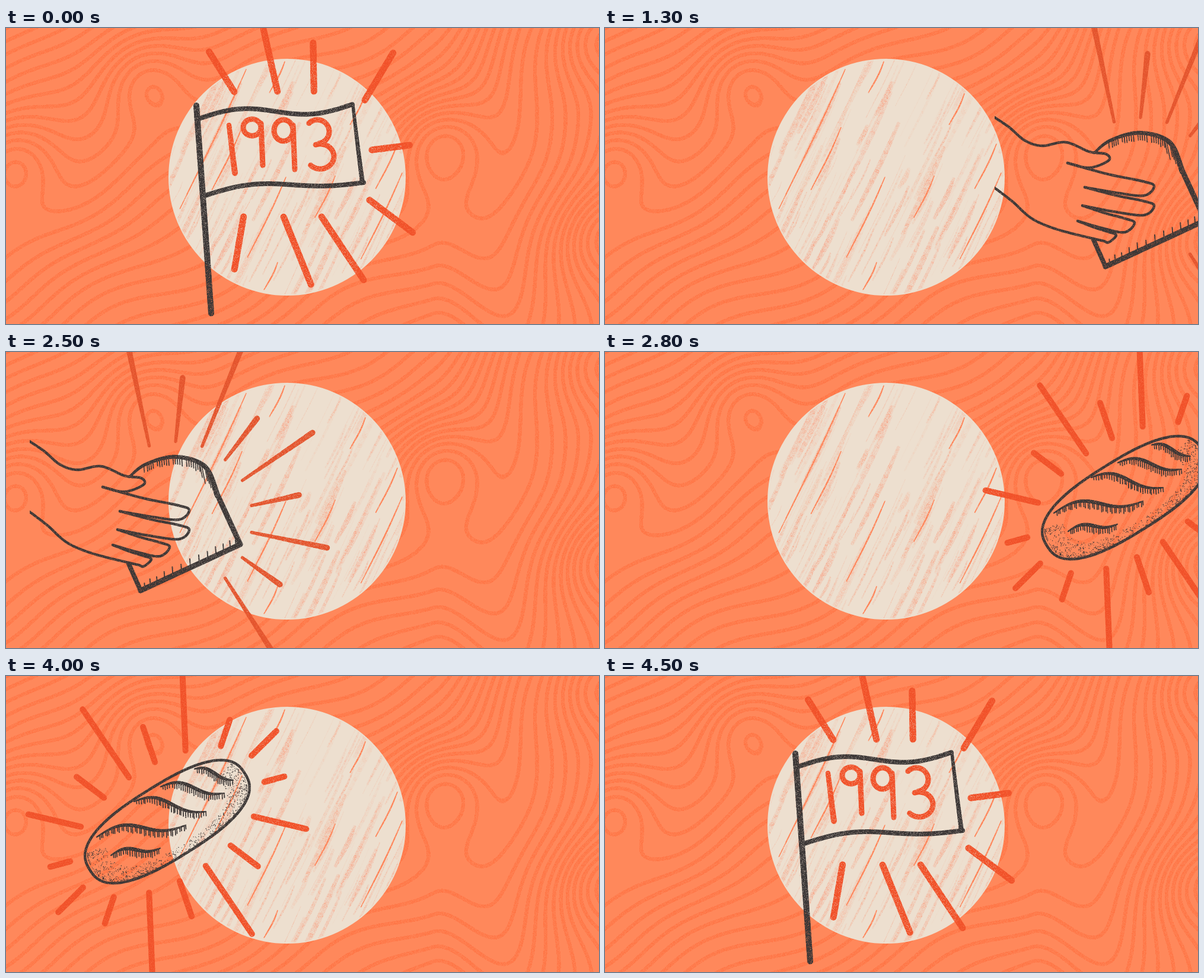
Recreate the animation shown at these times as an HTML page with a canvas. Size 1000x500 px, loop 4600 ms.

```html
<!DOCTYPE html>
<html lang="en">
<head>
<meta charset="utf-8">
<title>1993, sliced bread, loaf</title>
<style>
  html, body { margin: 0; width: 100%; height: 100%; overflow: hidden; background: #ff885b; }
  canvas { display: block; width: 100vw; height: 100vh; }
</style>
</head>
<body>
<canvas id="stage" width="1000" height="500" role="img" aria-label="A flag reading 1993, a hand with a slice of bread, a loaf"></canvas>
<script>
const W = 1000, H = 500;
const ORANGE = '#ff885b', CREAM = '#eddfcf', RED = '#f1522a', RUST = '#e4552e', INK = '#3d3837';
const { PI, sin, cos, abs, hypot, floor } = Math;
const rad = deg => deg * PI / 180;
const wave = (deg, phase = 0) => cos(rad(deg - phase));
const mix = (a, b, u) => a + (b - a) * u;

let seed = 1993;
function rnd() {
  seed = (seed + 0x6d2b79f5) | 0;
  let t = Math.imul(seed ^ (seed >>> 15), 1 | seed);
  t = (t + Math.imul(t ^ (t >>> 7), 61 | t)) ^ t;
  return ((t ^ (t >>> 14)) >>> 0) / 4294967296;
}

function layer() {
  const c = document.createElement('canvas');
  c.width = W;
  c.height = H;
  const g = c.getContext('2d');
  g.lineCap = g.lineJoin = 'round';
  return g;
}

// Wears random specks out of everything drawn so far on a layer.
function wear(g, share, strength) {
  const img = g.getImageData(0, 0, W, H), d = img.data;
  for (let i = 3; i < d.length; i += 4) {
    if (d[i] && rnd() < share) d[i] *= 1 - strength * mix(0.4, 1, rnd());
  }
  g.putImageData(img, 0, 0);
}

// Samples a function of progress 0..1.
const sample = (fn, n = 60) => Array.from({ length: n + 1 }, (_, i) => fn(i / n));

// Catmull-Rom curve through flat x,y pairs.
function spline(p) {
  const last = p.length / 2 - 1;
  const at = i => {
    const k = 2 * Math.max(0, Math.min(last, i));
    return [p[k], p[k + 1]];
  };
  return sample(u => {
    const i = Math.min(last - 1, floor(u * last)), t = u * last - i;
    const [a, b, c, d] = [at(i - 1), at(i), at(i + 1), at(i + 2)];
    return [0, 1].map(k => b[k] + 0.5 * t * (c[k] - a[k]
      + t * (2 * a[k] - 5 * b[k] + 4 * c[k] - d[k]
      + t * (3 * b[k] - a[k] - 3 * c[k] + d[k]))));
  }, last * 14);
}

// Line from one end to the other with an S bend (s) and a bow (b).
const ripple = (x1, y1, x2, y2, s, b) =>
  sample(u => [mix(x1, x2, u), mix(y1, y2, u) + s * sin(2 * PI * u) + b * sin(PI * u)]);

const arc = (cx, cy, rx, ry, from, to) =>
  sample(u => [cx + rx * wave(mix(from, to, u)), cy + ry * sin(rad(mix(from, to, u)))]);

function stroke(g, curve, width, color) {
  g.strokeStyle = color;
  g.lineWidth = width;
  g.beginPath();
  curve.forEach(q => g.lineTo(...q));
  g.stroke();
}

// Stroke whose width is a function of progress 0..1.
function brush(g, curve, width, color) {
  for (let i = 1; i < curve.length; i++) {
    stroke(g, [curve[i - 1], curve[i]], width(i / curve.length), color);
  }
}

function ticks(g, curve, gap, width, vec) {
  let run = 0;
  curve.forEach(([x, y], i) => {
    if (i) run += hypot(x - curve[i - 1][0], y - curve[i - 1][1]);
    if (run < gap) return;
    run -= gap;
    const [dx, dy] = vec(i / curve.length), k = mix(0.8, 1.15, rnd());
    stroke(g, [[x, y], [x + dx * k, y + dy * k]], width, INK);
  });
}

// Rays standing on a tilted superellipse; angles in degrees.
function burst(g, o) {
  for (let i = 0; i < o.count; i++) {
    const a = o.angle(i), dir = a + o.turn(i), len = o.lengths[i % o.lengths.length];
    const r = (abs(wave(a - o.tilt) / o.rx) ** o.power + abs(sin(rad(a - o.tilt)) / o.ry) ** o.power) ** (-1 / o.power);
    const x = o.x + r * wave(a), y = o.y + r * sin(rad(a));
    const line = sample(u => [x + u * len * wave(dir), y + u * len * sin(rad(dir))], 12);
    brush(g, line, u => mix(o.from, o.to, u), o.color);
  }
}

// Height field whose level lines form the wood grain.
function height(x, y) {
  const s = Math.max(0, Math.min(1, (x - 720) / 160)), ease = s * s * (3 - 2 * s);
  let f = mix(0.45 * x + 0.85 * y, 0.95 * x + 0.3 * y - 289, ease);
  f += 12 * sin(x / 60 + y / 90) + 8 * sin(y / 45 - x / 70);
  for (const [cx, cy] of [[10, 225], [235, 85], [735, 190], [1010, 350], [1000, 20]]) {
    f += 130 * Math.exp(-((x - cx) ** 2 + (y - cy) ** 2) / 6000);
  }
  return f;
}

function woodGrain() {
  const g = layer(), img = g.createImageData(W, H), gap = 25;
  for (let y = 0, i = 0; y < H; y++) {
    for (let x = 0; x < W; x++, i += 4) {
      const f = height(x, y);
      const slope = Math.max(0.3, hypot(height(x + 1, y) - f, height(x, y + 1) - f));
      const off = abs(f / gap - Math.round(f / gap)) * gap / slope;
      if (off < 3.2) img.data.set([255, 112, 64, mix(40, 225, rnd())], i);
    }
  }
  g.putImageData(img, 0, 0);
  return g.canvas;
}

function disc() {
  const base = layer(), marks = layer(), lean = 0.47;
  const streak = (x, y, drop, width, color) =>
    brush(marks, sample(u => [x - lean * drop * u + 1.5 * sin(4 * u), y + drop * u], 10),
      u => width * (0.5 + 0.5 * sin(PI * u)), color);
  base.fillStyle = CREAM;
  base.arc(474, 252, 200, 0, 7);
  base.fill();

  marks.arc(474, 252, 198, 0, 7);
  marks.clip();
  for (let i = 0; i < 170; i++) {
    streak(mix(270, 760, rnd()), mix(20, 420, rnd()), mix(30, 170, rnd()),
      mix(1, 10, rnd() ** 2), `rgba(250,150,118,${mix(0.1, 0.4, rnd())})`);
  }
  wear(marks, 0.7, 0.8);
  for (const [x, y, drop] of [[405, 70, 235], [470, 57, 52], [668, 245, 145], [660, 196, 75],
    [606, 111, 52], [555, 250, 70], [472, 252, 135], [458, 396, 46], [398, 168, 105]]) {
    streak(x, y, drop, 2.6, '#ff8458');
  }
  wear(marks, 0.2, 0.5);
  base.drawImage(marks.canvas, 0, 0);
  return base.canvas;
}

function flag() {
  const g = layer();
  burst(g, {
    x: 473, y: 213, rx: 144, ry: 106, power: 6, tilt: 0, count: 9,
    angle: i => 230 + 31.8 * i, turn: i => 18 * wave(72 * i) - 10,
    lengths: [80, 108, 82, 93, 64, 91, 128, 123, 90], from: 11, to: 11, color: RED
  });
  // lettering
  const nine = (x, y, rx, ry, foot) => {
    stroke(g, arc(x, y, rx, ry, 0, 360), 9, RED);
    stroke(g, [[x + rx, y - ry / 2], [x + rx + 3, foot]], 9, RED);
  };
  brush(g, spline([376, 164, 386, 245]), u => 8 + 2 * u, RED);
  nine(415, 168, 15, 14, 232);
  nine(468, 173, 16, 18, 239);
  stroke(g, arc(525, 175, 20, 20, 225, 440), 9, RED);
  stroke(g, arc(530, 217, 23, 21, 250, 495), 9, RED);
  // cloth and pole
  brush(g, spline([321, 131, 331, 270, 346, 482]), () => 10, INK);
  stroke(g, ripple(326, 153, 584, 129, -10, 0), 8, INK);
  stroke(g, ripple(336, 283, 603, 261, -6, -8), 8, INK);
  brush(g, spline([585, 130, 592, 190, 601, 261]), u => 5 + 3 * u, INK);
  wear(g, 0.24, 0.5);
  return g.canvas;
}

function handAndSlice() {
  const g = layer();
  g.rect(245, 0, 755, 500);
  g.clip();
  burst(g, {
    x: 490, y: 282, rx: 131, ry: 131, power: 2, tilt: 0, count: 9,
    angle: i => 250.6 + 19.9 * i, turn: i => 1.5 + 6 * wave(45 * i),
    lengths: [174, 108, 187, 88, 143, 82, 130, 78, 147], from: 5, to: 10, color: RUST
  });
  // slice
  const crust = spline([413, 211, 440, 190, 490, 177, 540, 193, 561, 240]);
  const side = spline([561, 240, 600, 325]), foot = spline([432, 403, 600, 325]);
  const n = crust.length;
  brush(g, crust, u => 4 + 5 * u, INK);
  stroke(g, side, 9, INK);
  stroke(g, foot, 9, INK);
  stroke(g, [[432, 403], [412, 358]], 8, INK);
  ticks(g, crust.slice(n * 0.2, n * 0.72), 4.5, 1.8, u => [1, 11 + 4 * u]);
  ticks(g, crust.slice(n * 0.66, n * 0.86), 5, 1.6, () => [6, 30]);
  ticks(g, foot, 4.8, 2, u => [-1, -10 - 4 * sin(PI * u)]);
  // hand: forearm with thumb, four fingers between knuckle valleys, wrist
  const line = p => stroke(g, spline(p), 4.4, INK);
  const valleys = [[368, 228], [397, 269], [393, 300], [385, 326], [412, 356]];
  const tips = [[514, 271], [514, 304], [481, 333], [450, 353]];
  line([245, 151, 270, 168, 296, 190, 325, 199, 365, 193, 405, 209, 433, 213, 437, 224, 405, 236, ...valleys[0]]);
  tips.forEach(([x, y], i) => {
    const [ax, ay] = valleys[i], [bx, by] = valleys[i + 1], r = i < 3 ? 12 : 9;
    line([ax, ay, mix(ax, x - r, 0.5), mix(ay, y - r, 0.6), x - 1.6 * r, y - r, x, y - r / 3,
      x - 1.4 * r, y + r, mix(bx, x, 0.45), mix(by, y + r, 0.65), bx, by]);
  });
  line([...valleys[4], 350, 340, 308, 322, 275, 293, 245, 270]);
  wear(g, 0.24, 0.4);
  return g.canvas;
}

function loaf() {
  const g = layer(), x = 466, y = 246, tilt = -32;
  burst(g, {
    x, y, rx: 183, ry: 98, power: 2, tilt, count: 16,
    angle: i => 230.5 + 22.5 * i + 9 * wave(45 * i, 99), turn: i => 18 * wave(45 * i, 292),
    lengths: [139, 63, 140, 47, 59, 35, 91, 58], from: 10, to: 10, color: RED
  });
  // point of the crust at angle a, scaled towards the middle by k
  const rim = (a, k = 1) => {
    const bend = v => Math.sign(v) * abs(v) ** 0.78;
    const p = 154 * k * bend(wave(a)), q = 62 * k * bend(sin(rad(a)));
    return [x + p * wave(tilt) - q * sin(rad(tilt)), y + p * sin(rad(tilt)) + q * wave(tilt)];
  };
  // shaded edge
  g.fillStyle = INK;
  for (let i = 0; i < 1100; i++) {
    const a = mix(-20, 200, rnd()), depth = 0.03 + 0.24 * rnd() ** 2;
    g.beginPath();
    g.arc(...rim(a, 1 - depth), mix(0.4, 0.9, rnd()), 0, 7);
    g.fill();
  }
  // scores
  for (const [x1, y1, x2, y2] of [[512, 157, 577, 176], [455, 187, 562, 198], [410, 212, 531, 229],
    [347, 272, 497, 252], [371, 303, 454, 291]]) {
    const len = x2 - x1, cut = ripple(x1, y1, x2, y2, -0.06 * len, -0.045 * len);
    brush(g, cut, u => 2 + 4 * sin(PI * u), INK);
    ticks(g, cut, 3.8, 1.8, u => [0.5, 3 + 9 * sin(PI * (0.1 + 0.75 * u))]);
  }
  stroke(g, sample(u => rim(360 * u), 180), 4.6, INK);
  wear(g, 0.22, 0.4);
  return g.canvas;
}

const backdrop = layer();
backdrop.fillStyle = ORANGE;
backdrop.fillRect(0, 0, W, H);
backdrop.drawImage(woodGrain(), 0, 0);
backdrop.drawImage(disc(), 0, 0);

// Each drawing rests, then moves left by `step` six times while the next one arrives.
const LOOP = 4600, PERIOD = 1500, REST = 1000, BEAT = 100, MOVES = 6;
const scenes = [
  { art: flag(), step: 206 },
  { art: handAndSlice(), step: 205 },
  { art: loaf(), step: 194 }
];
const view = document.getElementById('stage').getContext('2d');
const start = performance.now();
let shown = '';

function frame() {
  const t = (performance.now() - start) % LOOP;
  const i = floor(t / PERIOD) % scenes.length;
  const local = t % PERIOD;
  const moves = local < REST ? 0 : floor((local - REST) / BEAT) + 1;
  const key = i + ':' + moves;
  if (key !== shown) {
    shown = key;
    const { art, step } = scenes[i];
    view.drawImage(backdrop.canvas, 0, 0);
    view.drawImage(art, -step * moves, 0);
    if (moves) view.drawImage(scenes[(i + 1) % scenes.length].art, step * (MOVES - moves), 0);
  }
  requestAnimationFrame(frame);
}
frame();
</script>
</body>
</html>
```
